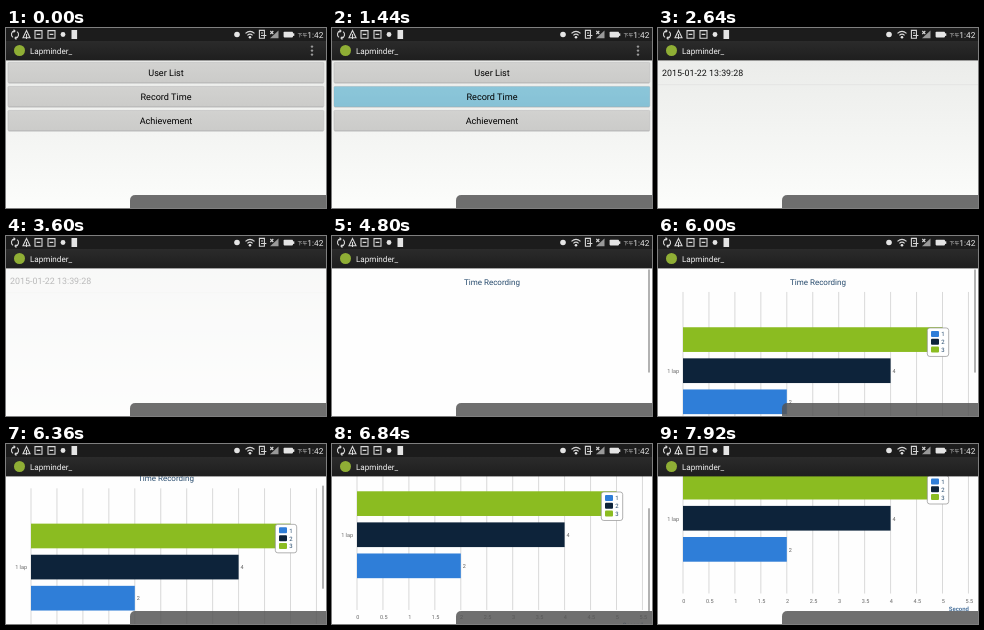
Recreate the animation shown at these times as an HTML page. Size 320 by 180 pixels, loop 8000 ms.

```html
<!DOCTYPE html>
<html lang="en">
<head>
<meta charset="utf-8">
<title>Lap times</title>
<style>
  html, body { margin: 0; width: 100%; height: 100%; overflow: hidden; background: #fff; }
  svg { display: block; width: 100vw; height: 100vh; font-family: Roboto, sans-serif; text-rendering: geometricPrecision; }
</style>
</head>
<body>
<svg viewBox="0 0 320 180" preserveAspectRatio="none">
  <defs>
    <linearGradient id="paper" x2="0" y2="1">
      <stop offset="0" stop-color="#ebecea"/><stop offset="1" stop-color="#fcfdfb"/>
    </linearGradient>
    <linearGradient id="metal" x2="0" y2="1">
      <stop offset="0" stop-color="#d2d2d0"/><stop offset="1" stop-color="#cbcbc9"/>
    </linearGradient>
    <linearGradient id="bar" x2="0" y2="1">
      <stop offset="0" stop-color="#2b2b2b"/><stop offset="1" stop-color="#1e1e1e"/>
    </linearGradient>
  </defs>

  <g id="menu"><rect y="32" width="320" height="148" fill="url(#paper)"/></g>

  <g id="list">
    <rect y="32" width="320" height="148" fill="url(#paper)"/>
    <rect id="row" y="32" width="320" height="24.5" fill="#33b5e5"/>
    <text x="4" y="48" font-size="8.9" fill="#111">2015-01-22 13:39:28</text>
    <path d="M0 56.7H320" stroke="#dcdcdc" stroke-width=".6"/>
  </g>

  <g id="page">
    <rect y="32" width="320" height="148" fill="#fefefe"/>
    <g id="content">
      <text id="title" x="160" y="49" font-size="8" text-anchor="middle" fill="#274b6d">Time Recording</text>
      <g id="chart"></g>
    </g>
    <rect id="thumb" x="316" width="2" height="103" fill="#b2b2b2"/>
  </g>

  <rect width="320" height="13" fill="#1c1c1c"/>
  <rect y="13" width="320" height="19.4" fill="url(#bar)"/>
  <circle cx="13.5" cy="22.5" r="5.5" fill="#8fae35"/>
  <text x="24" y="25.6" font-size="8.1" fill="#f2f2f2">Lapminder_</text>
  <g id="dots" fill="#9a9a9a">
    <circle cx="306" cy="18.6" r="1.2"/><circle cx="306" cy="22.6" r="1.2"/><circle cx="306" cy="26.6" r="1.2"/>
  </g>

  <g fill="none" stroke="#d8d8d8" stroke-width="1.1">
    <path d="M7 9.4A3.6 3.6 0 0 1 8.4 2.9M11 3.6A3.6 3.6 0 0 1 9.6 10.1M7.6 1.6l1.4 1.3-1.4 1.4M10.4 8.7L9 10.1l1.4 1.4"/>
    <path d="M20.5 2.6L24 9.8H17ZM20.5 6V11"/>
    <path d="M29 2.6H36V10.2H29ZM30.6 6.4H34.4M42 2.6H49V10.2H42ZM43.6 6.4H47.4"/>
    <path d="M239.5 5.4Q244 1.2 248.5 5.4M241.4 7.4Q244 4.8 246.6 7.4"/>
    <path d="M253.4 2.4H258.4V10.2H253.4ZM255 5H257M255 7.5H260.4"/>
    <path d="M264.3 3l3 3M267.3 3l-3 3"/>
  </g>
  <g fill="#e4e4e4">
    <circle cx="57" cy="6.5" r="2.4"/>
    <rect x="65.5" y="2" width="5.6" height="9"/>
    <circle cx="231" cy="6.5" r="2.8"/>
    <circle cx="244" cy="9.2" r="1.3"/>
    <path d="M264 10.3H272.5V2.5Z" fill="#999"/>
    <rect x="277.6" y="3.8" width="9.4" height="5.6" rx=".8"/><rect x="287" y="5.3" width="1.3" height="2.6"/>
    <text x="291.6" y="8.8" font-size="4.9" font-family="Noto Sans CJK TC, Noto Sans CJK, sans-serif">下午</text>
    <text x="301.3" y="9.6" font-size="8.3">1:42</text>
  </g>

  <path d="M124 180V172.5Q124 167 129.5 167H320V180Z" fill="#545454" fill-opacity=".84"/>
</svg>
<script>
const NS = 'http://www.w3.org/2000/svg';
const $ = id => document.getElementById(id);
const LOOP = 8000, STEP = 120;
const X0 = 25, UNIT = 51.9;

function add(parent, tag, attrs, text) {
  const el = document.createElementNS(NS, tag);
  for (const k in attrs) el.setAttribute(k, attrs[k]);
  if (text !== undefined) el.textContent = text;
  return parent.appendChild(el);
}
const set = (id, k, v) => $(id).setAttribute(k, v);
const ramp = (t, from, to) => Math.min(1, Math.max(0, (t - from) / (to - from)));
const swing = p => 0.5 - Math.cos(p * Math.PI) / 2;

// Menu buttons
const buttons = ['User List', 'Record Time', 'Achievement'].map((label, i) => {
  const y = 34.4 + i * 24;
  const box = { x: 2, y, width: 315.8, height: 20.4, rx: 1 };
  add($('menu'), 'rect', { ...box, fill: 'url(#metal)', stroke: '#bababa', 'stroke-width': .6 });
  add($('menu'), 'path', { d: `M2.5 ${y + 20.5}H317.3`, stroke: '#a8a8a8', 'stroke-width': .7 });
  const glow = add($('menu'), 'rect', { ...box, fill: '#33b5e5', opacity: 0 });
  add($('menu'), 'text', { x: 160, y: y + 13.5, 'font-size': 9.1, 'text-anchor': 'middle', fill: '#000' }, label);
  return glow;
});

// Chart
const chart = $('chart');
const series = [
  { name: 3, value: 5, color: '#8bbc21' },
  { name: 2, value: 4, color: '#0d233a' },
  { name: 1, value: 2, color: '#2f7ed8' }
];
for (let i = 0; i <= 11; i++) {
  const x = X0 + i * UNIT / 2;
  add(chart, 'path', { d: `M${x} 56V210`, stroke: '#c0c0c0', 'stroke-width': .6 });
  add(chart, 'text', { x: x + .8, y: 219, 'font-size': 5.5, 'text-anchor': 'middle', fill: '#666' }, i / 2);
}
add(chart, 'text', { x: 21, y: 137, 'font-size': 5.5, 'text-anchor': 'end', fill: '#666' }, '1 lap');
add(chart, 'text', { x: 311, y: 227, 'font-size': 6, 'font-weight': 700, 'text-anchor': 'end', fill: '#4d759e' }, 'Second');
series.forEach((s, i) => {
  const y = 91.3 + i * 31.1;
  s.bar = add(chart, 'rect', { x: X0, y, height: 24.7, fill: s.color });
  s.label = add(chart, 'text', { x: X0 + s.value * UNIT + 2, y: y + 14.6, 'font-size': 5.5, fill: '#606060' }, s.value);
});
add(chart, 'rect', { x: 269.3, y: 92, width: 21.4, height: 28.5, rx: 2.5, fill: '#fff', stroke: '#909090', 'stroke-width': .7 });
series.slice().reverse().forEach((s, i) => {
  const y = 95 + i * 7.8;
  add(chart, 'rect', { x: 273, y, width: 8, height: 6, rx: 1, fill: s.color });
  add(chart, 'text', { x: 283.3, y: y + 5.5, 'font-size': 6, fill: '#274b6d' }, s.name);
});

function draw(t) {
  const toList = ramp(t, 1620, 2040), toPage = ramp(t, 3300, 3720);
  set('list', 'opacity', toList);
  set('page', 'opacity', toPage);
  set('dots', 'opacity', 1 - toList);
  buttons[1].setAttribute('opacity', t >= 1320 ? .45 * (1 - ramp(t, 1560, 1920)) : 0);
  set('row', 'opacity', t > 2700 ? .4 * (1 - ramp(t, 2880, 3120)) : 0);

  set('title', 'opacity', ramp(t, 4320, 4560));
  set('chart', 'opacity', t > 4860 ? 1 : 0);
  const grow = swing(ramp(t, 4680, 5470));
  for (const s of series) {
    s.bar.setAttribute('width', s.value * UNIT * grow);
    s.label.setAttribute('opacity', ramp(t, 5040, 5520));
  }

  const scroll = 60.5 * swing(ramp(t, 5975, 7305));
  set('content', 'transform', `translate(0 ${-scroll})`);
  set('thumb', 'y', 33.5 + scroll * .7);
  set('thumb', 'opacity', t < 5900
    ? ramp(t, 3600, 3840) * (1 - ramp(t, 4920, 5220))
    : ramp(t, 5900, 6000) * (1 - ramp(t, 7600, 7880)));
}

function tick(now) {
  draw(Math.floor(now % LOOP / STEP) * STEP);
  requestAnimationFrame(tick);
}
draw(0);
requestAnimationFrame(tick);
</script>
</body>
</html>
```
